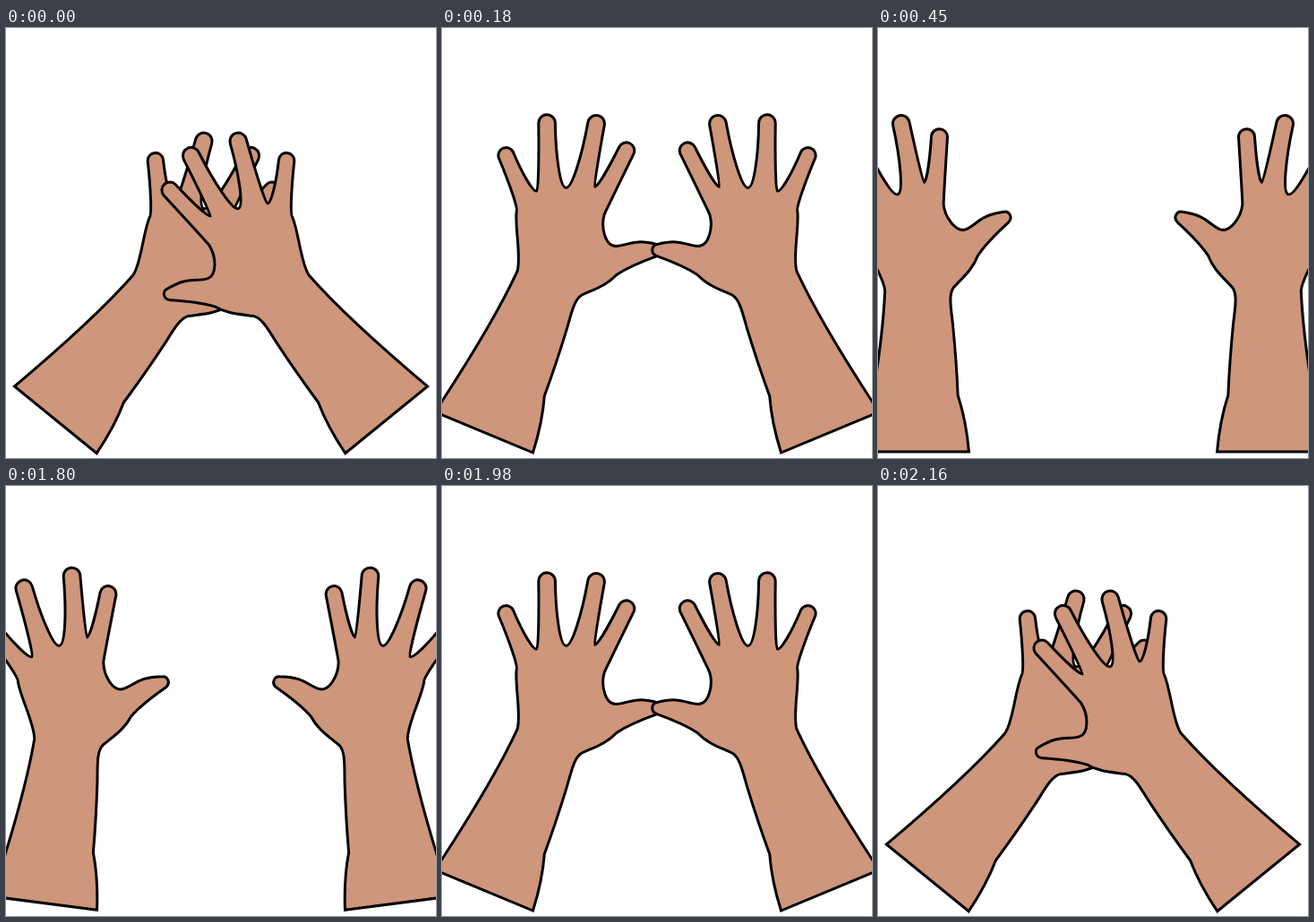
These frames come from a looping animation (480 px wide and 480 px high, 2250 ms). An HTML page:

```html
<!DOCTYPE html>
<html lang="en">
<head>
<meta charset="utf-8">
<title>Hands</title>
<style>
  html, body { margin: 0; width: 100%; height: 100%; overflow: hidden; background: #fff; }
  svg { display: block; width: 100%; height: 100%; }
</style>
</head>
<body>
<svg viewBox="0 0 480 480">
  <defs>
    <path id="arm" fill="#ce967b" stroke="#000" stroke-width="3"/>
  </defs>
  <use href="#arm" transform="matrix(-1 0 0 1 480 0)"/>
  <use href="#arm"/>
</svg>
<script>
const STEP = 90, STEPS = 25, POSES = 5;

// A finger from one valley to the next: centre of the round tip, radius, lean in degrees
function finger([ax, ay], [bx, by], tx, ty, r, lean) {
  const angle = lean * Math.PI / 180, cos = Math.cos(angle), sin = Math.sin(angle);
  // Point in finger coordinates: across from the axis, down from the tip centre
  const at = (across, down) =>
    [tx + across * cos - down * sin, ty + across * sin + down * cos]
      .map(v => v.toFixed(1)).join(" ");
  const local = (x, y) =>
    [(x - tx) * cos + (y - ty) * sin, (y - ty) * cos - (x - tx) * sin];
  // Pulls the valley end of a side towards the finger, so that it flares
  const flare = across => across - Math.sign(across) * 0.6 * (Math.abs(across) - r);
  const [a, aDown] = local(ax, ay), [b, bDown] = local(bx, by);
  return `C${at(flare(a), aDown)} ${at(-r, aDown * 0.5)} ${at(-r, 0)}` +
    `A${r} ${r} 0 0 1 ${at(r, 0)}` +
    `C${at(r, bDown * 0.5)} ${at(flare(b), bDown)} ${bx} ${by}`;
}

const valleys = [[300, 208], [311, 177], [343, 178], [375.5, 182], [398, 205]];
const tips = [
  [275.5, 136, 9, -26],
  [309.5, 106.5, 9.3, -10],
  [364.5, 106, 9.3, 1],
  [410, 142, 8.7, 23]
];

const arm = document.getElementById("arm");
arm.setAttribute("d", [
  "M378.5 474Q368 440 366 411Q353 375 341 335C336 317 333 303 325 298", // inner forearm
  "C310 291 297 287 286 275Q271 265 241 254C233 251 235 242 241 241",   // thumb
  "C268 234 274 243 287 243C299 243 304 222 300 208",
  ...tips.map((tip, i) => finger(valleys[i], valleys[i + 1], ...tip)),
  "C400 222 392 258 397 272Q424 331 488 429Z"                           // outer forearm
].join(""));

function draw() {
  const step = Math.floor(performance.now() / STEP) % STEPS;
  // 0 is wide open, POSES is clasped
  const closed = POSES - Math.min(step, POSES, STEPS - 1 - step);
  const turn = 22.3 - 7.35 * closed - 0.0185 * closed ** 3;
  arm.setAttribute("transform", `rotate(${turn} 381 473.5)`);
  requestAnimationFrame(draw);
}
draw();
</script>
</body>
</html>
```
